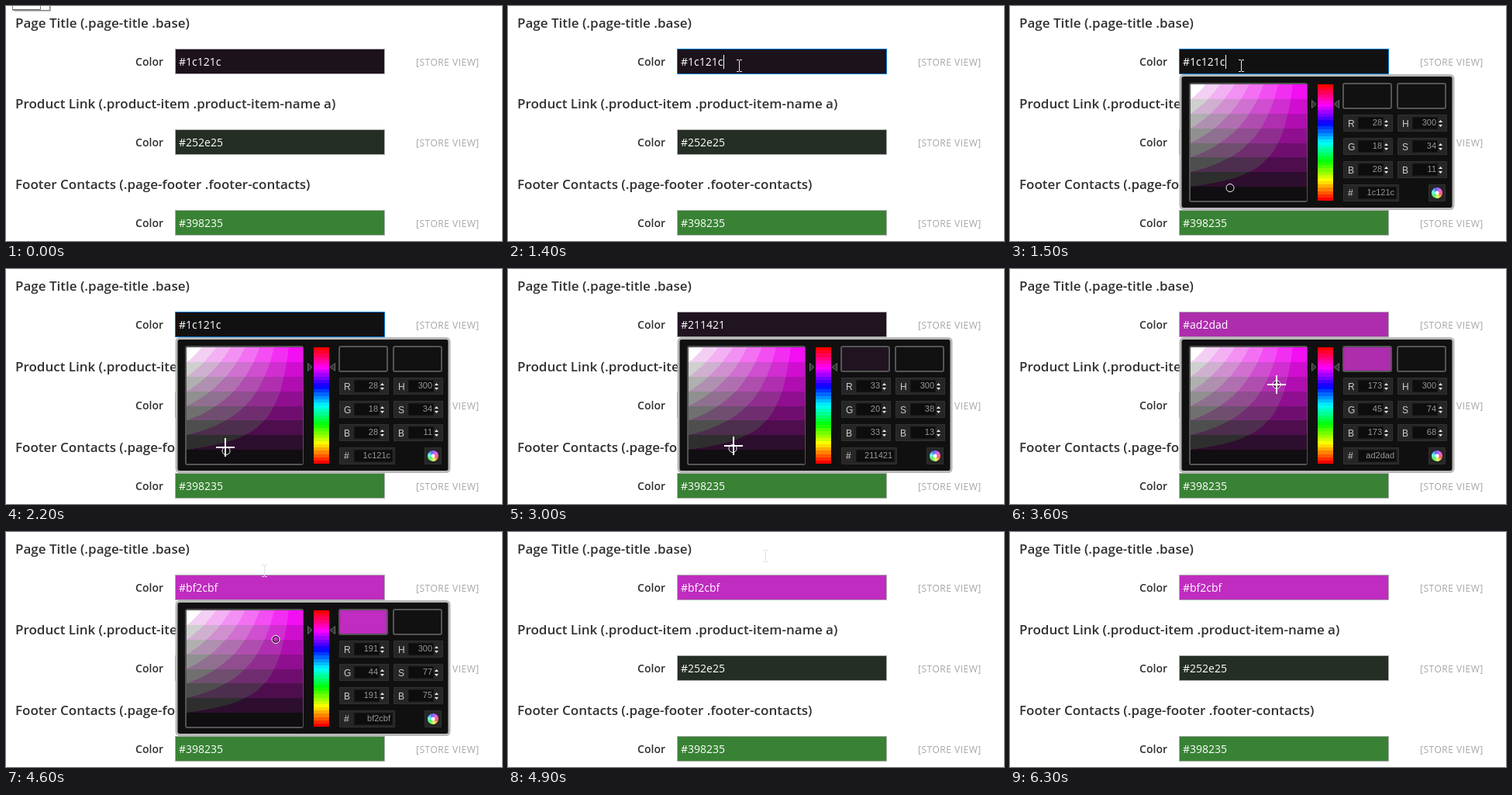
Write an HTML page with a canvas that moves like this. It is 640 px wide and 303 px high and loops after 6.5 s.

```html
<!DOCTYPE html>
<html lang="en">
<head>
<meta charset="utf-8">
<title>Color settings</title>
<style>
html, body { margin: 0; width: 100%; height: 100%; overflow: hidden; background: #fff; }
canvas { display: block; }
</style>
</head>
<body>
<canvas id="stage" width="640" height="303"></canvas>
<script>
const c = document.getElementById('stage').getContext('2d');
const LOOP = 6500;
const UI = '"Open Sans", sans-serif', SMALL = '"Liberation Sans", Arial, sans-serif';
const SQ = { x: 233, y: 101, size: 150 };

// Keys: [time, x, y]
const pointerIn = [[300, 50, -10], [400, 84, 10], [500, 150, 34], [600, 215, 55], [700, 262, 70],
  [800, 290, 76], [900, 298, 77], [1700, 298, 77], [1800, 299, 87], [1900, 297, 122], [2000, 290, 168],
  [2100, 285, 206], [2200, 283, 230], [2300, 285, 236], [2400, 288, 238], [2600, 288, 238],
  [2700, 288, 237], [2800, 288, 237], [2900, 290, 232], [3000, 291, 228], [3300, 318, 188],
  [3600, 344, 149], [3800, 348, 138], [4200, 348, 138], [4300, 347, 130], [4400, 342, 106],
  [4500, 337, 76], [4600, 333, 50], [4700, 331, 38], [4800, 331, 38], [4900, 332, 31], [5300, 326, -10]];
// Keys: [time, saturation, brightness]
const picked = [[2800, .34, .11], [2900, .37, .11], [3000, .38, .13], [3300, .56, .39],
  [3600, .74, .68], [3800, .767, .75]];

function at(keys, t) {
  const i = keys.findIndex(k => k[0] > t);
  if (i === 0) return keys[0].slice(1);
  if (i < 0) return keys[keys.length - 1].slice(1);
  const a = keys[i - 1], b = keys[i], p = (t - a[0]) / (b[0] - a[0]);
  return [a[1] + (b[1] - a[1]) * p, a[2] + (b[2] - a[2]) * p];
}

function rect(x, y, w, h, fill) {
  c.fillStyle = fill;
  c.fillRect(x, y, w, h);
}

function box(x, y, w, h, fill, stroke, line = 1, radius = 0) {
  c.beginPath();
  c.roundRect(x + line / 2, y + line / 2, w - line, h - line, radius);
  c.fillStyle = fill;
  c.fill();
  c.strokeStyle = stroke;
  c.lineWidth = line;
  c.stroke();
}

function text(s, x, y, font, fill, align = 'left', spacing = 0) {
  c.font = font;
  c.fillStyle = fill;
  c.textAlign = align;
  c.letterSpacing = spacing + 'px';
  c.fillText(s, x, y);
}

function poly(points, fill, stroke) {
  c.beginPath();
  points.forEach(p => c.lineTo(...p));
  c.closePath();
  c.fillStyle = fill;
  c.fill();
  if (stroke) {
    c.strokeStyle = stroke;
    c.lineWidth = 1;
    c.stroke();
  }
}

function ring(x, y, r, color) {
  c.beginPath();
  c.arc(x, y, r, 0, 7);
  c.strokeStyle = color;
  c.lineWidth = 1;
  c.stroke();
}

// Saturation/brightness square, posterised to eight levels per channel
const square = document.createElement('canvas');
square.width = square.height = SQ.size;
{
  const g = square.getContext('2d'), img = g.createImageData(SQ.size, SQ.size);
  const level = v => [16, 46, 78, 112, 144, 176, 208, 243][Math.min(7, Math.floor(v * 8))];
  for (let y = 0, i = 0; y < SQ.size; y++) {
    for (let x = 0; x < SQ.size; x++, i += 4) {
      const v = 1 - y / SQ.size, low = v * (1 - x / SQ.size);
      const white = low > .875, m = white ? 255 : level(v);
      img.data.set([m, white ? 255 : low < .125 ? 14 : level(low), m, 255], i);
    }
  }
  g.putImageData(img, 0, 0);
}

function row(i, title, value, color, border) {
  const y = i * 104;
  text(title, 12, y + 28, '600 17px ' + UI, '#303030');
  text('Color', 203, y + 77, '600 14px ' + UI, '#303030', 'right');
  box(218, y + 55, 271, 33, color, border);
  text(value, 223, y + 77, '14px ' + UI, '#fff');
  text('[STORE VIEW]', 529, y + 77, '12px ' + UI, '#a6a6a6', 'left', .5);
}

function spinner(x, y, label, value) {
  box(x, y, 64, 22, '#262626', '#303030');
  text(label, x + 6, y + 16, '12px ' + SMALL, '#ccc');
  box(x + 19, y + 3, 33, 16, '#0d0d0d', '#161616');
  text(value, x + 50, y + 14, '11px ' + SMALL, '#999', 'right');
  poly([[x + 53, y + 10], [x + 58, y + 10], [x + 55.5, y + 7]], '#eee');
  poly([[x + 53, y + 13], [x + 58, y + 13], [x + 55.5, y + 16]], '#eee');
}

function picker(s, v, color, r, g, hex) {
  box(218.5, 88, 355, 175, '#101010', '#b8b8b8', 3, 4);
  box(231, 99, 153, 154, '#101010', '#555', 2, 2);
  c.drawImage(square, SQ.x, SQ.y);

  for (let i = 0; i < 36; i++) {
    const y = Math.round(i * 150 / 36), end = Math.round((i + 1) * 150 / 36);
    rect(397, 101 + y, 20, end - y, `hsl(${360 - i * 360 / 35} 100% 50%)`);
  }
  poly([[389.5, 121.5], [395, 126.5], [389.5, 131.5]], '#333', '#666');
  poly([[424.5, 121.5], [418, 126.5], [424.5, 131.5]], '#333', '#666');

  box(429, 99, 64, 34, color, '#555', 2, 2);
  box(499, 99, 64, 34, '#111', '#555', 2, 2);
  [['R', r], ['G', g], ['B', r]].forEach(([k, n], i) => spinner(430, 140 + i * 30, k, n));
  [['H', 300], ['S', Math.round(s * 100)], ['B', Math.round(v * 100)]]
    .forEach(([k, n], i) => spinner(500, 140 + i * 30, k, n));

  box(430, 230, 72, 22, '#262626', '#303030');
  text('#', 436, 245, '12px ' + SMALL, '#ccc');
  box(449, 233, 50, 16, '#0d0d0d', '#161616');
  text(hex, 496, 244, '11px ' + SMALL, '#999', 'right');

  box(540, 230, 22, 22, '#262626', '#303030');
  for (let i = 0; i < 12; i++) {
    c.beginPath();
    c.moveTo(551, 241);
    c.arc(551, 241, 7, i * Math.PI / 6, (i + 1.1) * Math.PI / 6);
    c.fillStyle = `hsl(${i * 30} 90% 68%)`;
    c.fill();
  }
  c.beginPath();
  c.arc(551, 241, 2.5, 0, 7);
  c.fillStyle = '#fff';
  c.fill();

  const mx = SQ.x + s * SQ.size, my = SQ.y + (1 - v) * SQ.size;
  ring(mx, my, 4, '#000');
  ring(mx, my, 5, '#fff');
}

function pointer(x, y, open) {
  x = Math.round(x);
  y = Math.round(y);
  const inside = (l, t, r, b) => x >= l && x < r && y >= t && y < b;
  if (open && inside(SQ.x, SQ.y, 383, 251)) {
    rect(x - 12, y - 1, 24, 2, '#fff');
    rect(x - 1, y - 12, 2, 24, '#fff');
  } else if (open && inside(219, 89, 573, 263)) {
    poly([[x, y], [x, y + 16], [x + 4, y + 12], [x + 7, y + 18], [x + 9, y + 17],
      [x + 6, y + 11], [x + 11, y + 11]], '#fff', '#000');
  } else {
    const color = inside(218, 55, 489, 88) ? '#e8e8e8' : '#e0e0e0';
    rect(x, y - 7, 1, 14, color);
    for (const end of [-8, 7]) {
      rect(x - 3, y + end, 3, 1, color);
      rect(x + 1, y + end, 3, 1, color);
    }
  }
}

function popupEdge(t) {
  if (t < 100) {
    rect(11, 0, 47, 7, '#b5b5b5');
    box(8, -10, 49, 16, '#fff', '#888');
  }
  if (t < 400) box(8, -10, 37, 15, '#fff', '#777');
  if (t >= 5900 && t < 6300) {
    c.globalAlpha = t < 6100 ? .5 : t < 6200 ? .8 : .4;
    box(82, -5, 40, 23, '#fff', '#aaa');
    c.globalAlpha = 1;
  }
}

function draw(now) {
  const t = Math.floor(now % LOOP / 100) * 100;
  const open = t >= 1500 && t < 4900, focus = t >= 1300 && t < 2900;
  const [s, v] = at(picked, t);
  const r = Math.floor(v * 255), g = Math.floor(v * 255 * (1 - s));
  const hex = [r, g, r].map(n => n.toString(16).padStart(2, '0')).join('');
  const color = open && t < 2900 ? '#121112' : '#' + hex;

  rect(0, 0, 640, 303, '#fff');
  row(0, 'Page Title (.page-title .base)', '#' + hex, color, focus ? '#007bdb' : '#adadad');
  row(1, 'Product Link (.product-item .product-item-name a)', '#252e25', '#252e25', '#adadad');
  row(2, 'Footer Contacts (.page-footer .footer-contacts)', '#398235', '#398235', '#adadad');
  if (t >= 1300 && t < 1800) rect(278, 63, 1, 18, '#fff');
  if (open) picker(s, v, color, r, g, hex);
  popupEdge(t);
  if (t >= 400 && t < 5300) pointer(...at(pointerIn, t), open);
}

let start;
function tick(now) {
  start ??= now;
  draw(now - start);
  requestAnimationFrame(tick);
}
requestAnimationFrame(tick);
</script>
</body>
</html>
```
